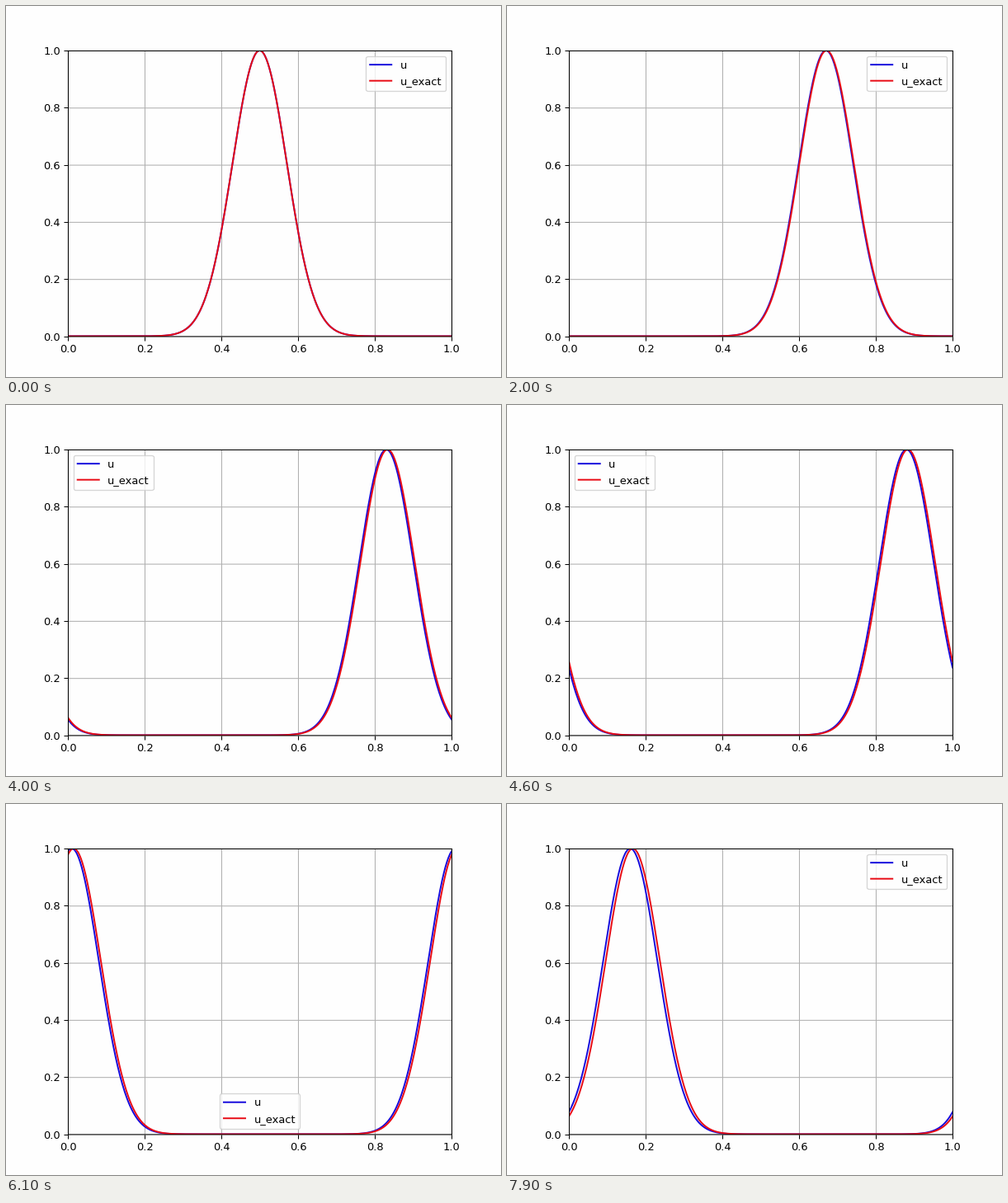
A matplotlib script for the animation above (8000 ms loop, 600 px wide and 450 px high).

```python
import numpy as np
import matplotlib.pyplot as plt
from matplotlib.animation import FuncAnimation
from matplotlib.transforms import Affine2D

FRAMES = 80
INTERVAL = 100          # ms
DX = 1 / 100            # shift of the computed wave per step
DT = 1 / 99             # shift of the exact wave per step
BLUE, RED = "#1408dc", "#e80a14"
PAPER = "#fefefe"

plt.rcParams.update({"figure.facecolor": PAPER, "axes.facecolor": PAPER})
x = np.linspace(0, 1, 501)


def pulse(shift):
    """Gaussian travelling to the right on a periodic unit interval."""
    d = (x - shift) % 1 - 0.5
    return np.exp(-100 * d**2)


def step_at(frame):
    """Every sixth frame repeats the previous step."""
    return frame - (frame + 3) // 6


fig, ax = plt.subplots(figsize=(6.4, 4.8), dpi=93.75)
u_line, = ax.plot(x, pulse(0), color=BLUE, label="u")
exact_line, = ax.plot(x, pulse(0), color=RED, label="u_exact")
ax.set_xlim(0, 1)
ax.set_ylim(0, 1)
ax.grid(True)
legend = ax.legend(loc="best")   # placed anew on every draw

# Soft rules, centred half a pixel right and down instead of snapped.
half_pixel = Affine2D().translate(0.47, -0.47)
for rule in [*ax.get_xgridlines(), *ax.get_ygridlines(), *ax.spines.values()]:
    rule.set_snap(False)
    rule.set_transform(rule.get_transform() + half_pixel)
for key in legend.get_lines():
    key.set_snap(False)


def update(frame):
    n = step_at(frame)
    u_line.set_ydata(pulse(n * DX))
    exact_line.set_ydata(pulse(n * DT))
    return u_line, exact_line


anim = FuncAnimation(fig, update, frames=FRAMES, interval=INTERVAL,
                     repeat=True, repeat_delay=0, blit=False)
plt.show()
```
